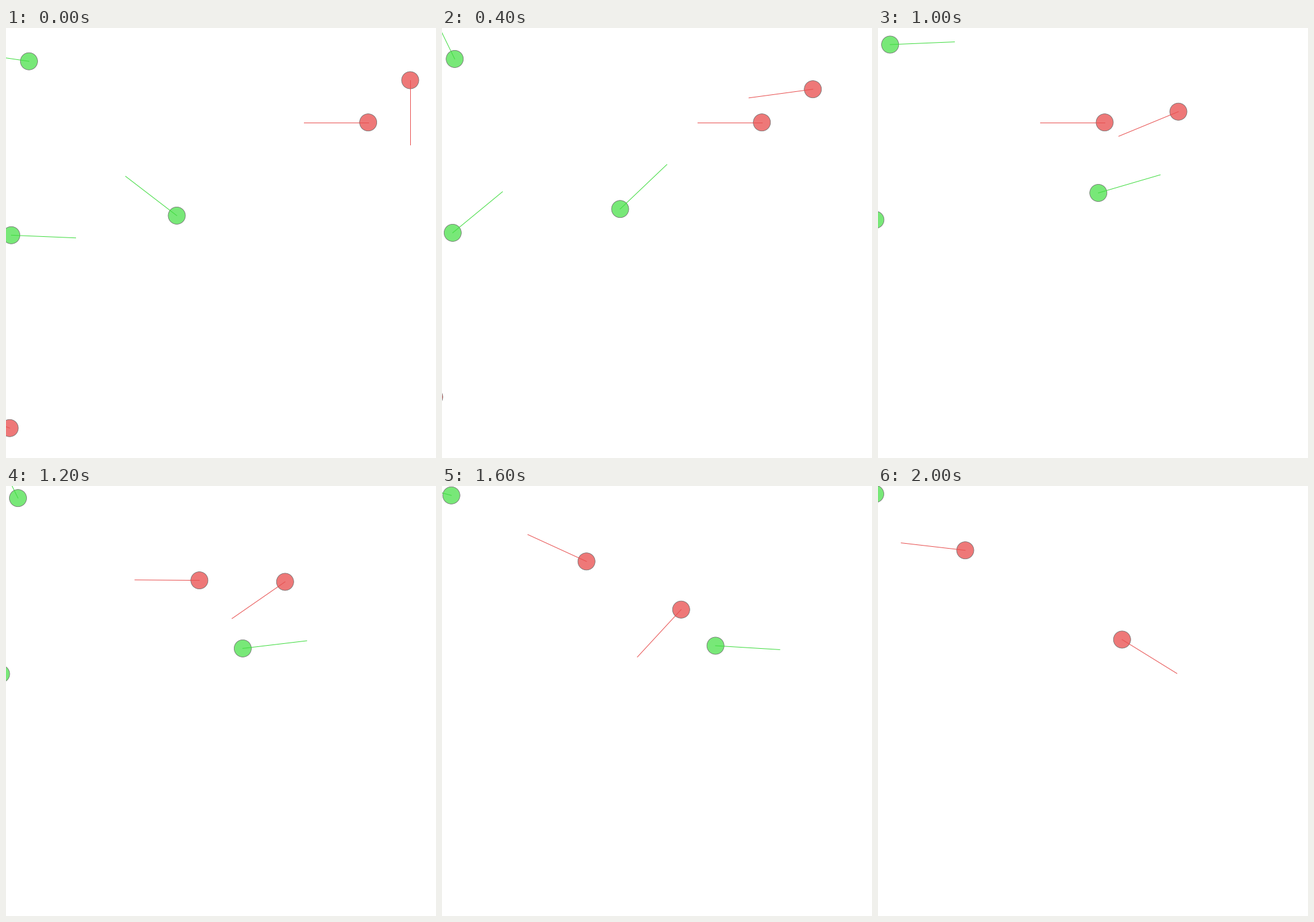
A matplotlib script that plays this animation: 700 by 700 pixels, repeating every 2100 ms.

```python
import numpy as np
import matplotlib.pyplot as plt
from matplotlib.animation import FuncAnimation
from matplotlib.patches import Circle

SIZE, DPI = 700, 100
FRAMES, STEP = 21, 100
RADIUS, REACH = 14, 105
PX = 72 / DPI

RED = ("#ee7878", "#e85050")
GREEN = ("#78e878", "#40dc40")


class Agent:
    """A disc with a heading line, steered through (time, x, y, heading) keys."""

    def __init__(self, ax, colors, keys, last=FRAMES):
        self.t, x, y, self.heading = np.array(keys, float).T
        self.pos = np.column_stack([x, y])
        self.slope = np.gradient(self.pos, self.t, axis=0,
                                 edge_order=min(2, len(keys) - 1))
        self.last = last
        fill, stroke = colors
        self.disc = ax.add_patch(Circle((0, 0), RADIUS, fc=fill, ec="#707070",
                                        lw=0.8 * PX, zorder=2))
        self.line, = ax.plot([], [], color=stroke, lw=PX, zorder=3)

    def place(self, t):
        """Cubic Hermite interpolation of the position."""
        t = np.clip(t, self.t[0], self.t[-1])
        i = min(np.searchsorted(self.t, t, side="right"), len(self.t) - 1) - 1
        h = self.t[i + 1] - self.t[i]
        u = (t - self.t[i]) / h
        a, b = self.pos[i:i + 2]
        ma, mb = self.slope[i:i + 2] * h
        return (a * (1 + 2 * u) * (1 - u) ** 2 + ma * u * (1 - u) ** 2
                + b * u * u * (3 - 2 * u) + mb * u * u * (u - 1))

    def draw(self, t):
        x, y = self.place(t)
        angle = np.radians(np.interp(t, self.t, self.heading))
        self.disc.center = x, y
        self.line.set_data([x, x + REACH * np.cos(angle)],
                           [y, y + REACH * np.sin(angle)])
        for part in (self.disc, self.line):
            part.set_visible(t <= self.last)
        return self.disc, self.line


fig = plt.figure(figsize=(SIZE / DPI, SIZE / DPI), dpi=DPI, facecolor="white")
ax = fig.add_axes([0, 0, 1, 1])
ax.set(xlim=(0, SIZE), ylim=(SIZE, 0))
ax.axis("off")

agents = [
    Agent(ax, RED, [
        (0, 658, 85, 90), (4, 603.7, 99.7, 172.3), (7, 541.3, 109.7, 169.3),
        (10, 489, 136.2, 157.6), (12, 454.3, 156, 145.3),
        (16, 389.3, 201.2, 132.7), (19, 390, 249, 85), (20, 397.3, 250, 31.7)]),
    Agent(ax, RED, [
        (0, 589.6, 153.7, 180), (4, 520.7, 153.7, 180), (7, 448.3, 153.7, 180),
        (10, 369, 153.7, 180), (12, 314.8, 153.6, 180.4),
        (16, 235.2, 122.8, 204.6), (20, 142, 104.7, 186.6)]),
    Agent(ax, RED, [(0, 6, 651.3, 200), (5, -17.5, 588, 200)]),
    Agent(ax, GREEN, [
        (0, 37.4, 54.2, 188.3), (4, 20.7, 50.4, 244), (7, 14, 32.9, 256.4),
        (10, 19.7, 27, 357.6), (12, 19.5, 19.7, 244),
        (16, 15.2, 15.3, 195), (20, -4.5, 13, 180)]),
    Agent(ax, GREEN, [
        (0, 278, 305.4, 217.5), (4, 290, 294.7, 316.4), (7, 319.2, 278.2, 338.8),
        (10, 358.7, 268.5, 343.7), (12, 385.4, 264.4, 353.2),
        (16, 445.2, 260, 363.5), (18, 470, 262, 390)], last=18),
    Agent(ax, GREEN, [
        (0, 8.6, 337.3, 362.4), (4, 17.4, 333.4, 320.5), (7, 13.2, 327, 232.6),
        (10, -4.2, 312.2, 225), (12, -8, 306, 225), (16, -30, 295, 225)]),
]


def update(t):
    return [part for agent in agents for part in agent.draw(t)]


anim = FuncAnimation(fig, update, frames=FRAMES, interval=STEP,
                     repeat=True, repeat_delay=0)
plt.show()
```
